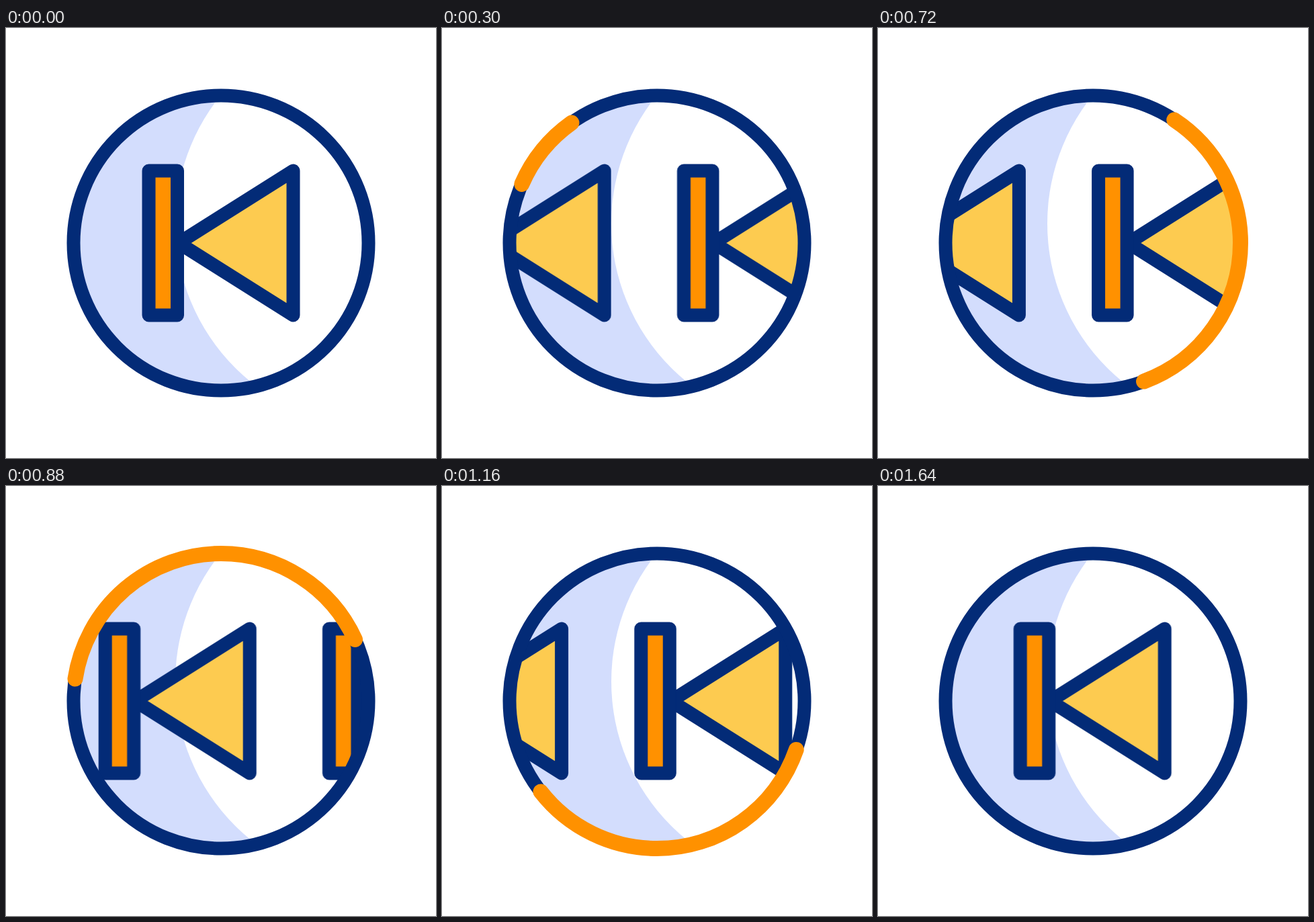
These frames come from a looping animation (640 by 640 pixels, 2420 ms). An HTML page without scripts:

```html
<!DOCTYPE html>
<html lang="en">
<head>
<meta charset="utf-8">
<title>Previous button</title>
<style>
  @property --head { syntax: "<length>"; inherits: false; initial-value: 0px; }
  @property --tail { syntax: "<length>"; inherits: false; initial-value: 0px; }

  html, body { margin: 0; width: 100%; height: 100%; overflow: hidden; background: #fff; }
  svg { display: block; width: 100%; height: 100%; }

  .line { stroke: #032b77; stroke-width: 20; stroke-linejoin: round; }
  .strip { animation: scroll 2420ms infinite; }

  /* path length is set to 720, so 1px of dash is one degree */
  .arc {
    fill: none;
    stroke: #ff9100;
    stroke-width: 23;
    stroke-linecap: round;
    stroke-dasharray: calc(var(--head) - var(--tail)) 2000px;
    stroke-dashoffset: calc(var(--tail) * -1);
    animation: head 2420ms infinite, tail 2420ms infinite, show 2420ms step-end infinite;
  }

  /* motion takes 1600 of 2420 ms, then rests */
  @keyframes scroll {
    0% { transform: translateX(0); animation-timing-function: cubic-bezier(.333, 0, .3, 1); }
    66.116%, 100% { transform: translateX(-1333.6px); }
  }
  @keyframes head {
    0% { --head: 0px; animation-timing-function: cubic-bezier(.352, 0, .593, 1); }
    66.116%, 100% { --head: 720px; }
  }
  @keyframes tail {
    0% { --tail: 0px; animation-timing-function: cubic-bezier(.49, 0, .81, 1); }
    66.116%, 100% { --tail: 720px; }
  }
  @keyframes show {
    0% { visibility: hidden; }
    .5% { visibility: visible; }
    66.1%, 100% { visibility: hidden; }
  }
</style>
</head>
<body>
<svg viewBox="0 0 640 640">
  <defs>
    <clipPath id="disc"><circle cx="320" cy="320" r="219.5"/></clipPath>
    <g id="icon" class="line">
      <path d="M427.5 212.5V427.5L257 320Z" fill="#fdcb50"/>
      <rect x="212.5" y="212.5" width="42.5" height="215" fill="#ff9100"/>
    </g>
  </defs>

  <g clip-path="url(#disc)">
    <circle cx="320" cy="320" r="219.5" fill="#d3ddfd"/>
    <circle cx="555.4" cy="291" r="303.4" fill="#fff"/>
    <g class="strip">
      <use href="#icon" x="-333.2"/>
      <use href="#icon"/>
      <use href="#icon" x="333.2"/>
      <use href="#icon" x="666.4"/>
      <use href="#icon" x="999.6"/>
      <use href="#icon" x="1332.8"/>
      <use href="#icon" x="1666"/>
    </g>
  </g>

  <circle class="line" cx="320" cy="320" r="219.5" fill="none"/>
  <!-- two anticlockwise turns from the top -->
  <path class="arc" pathLength="720" d="M320 100.5
    a219.5 219.5 0 0 0 0 439 a219.5 219.5 0 0 0 0 -439
    a219.5 219.5 0 0 0 0 439 a219.5 219.5 0 0 0 0 -439"/>
</svg>
</body>
</html>
```
